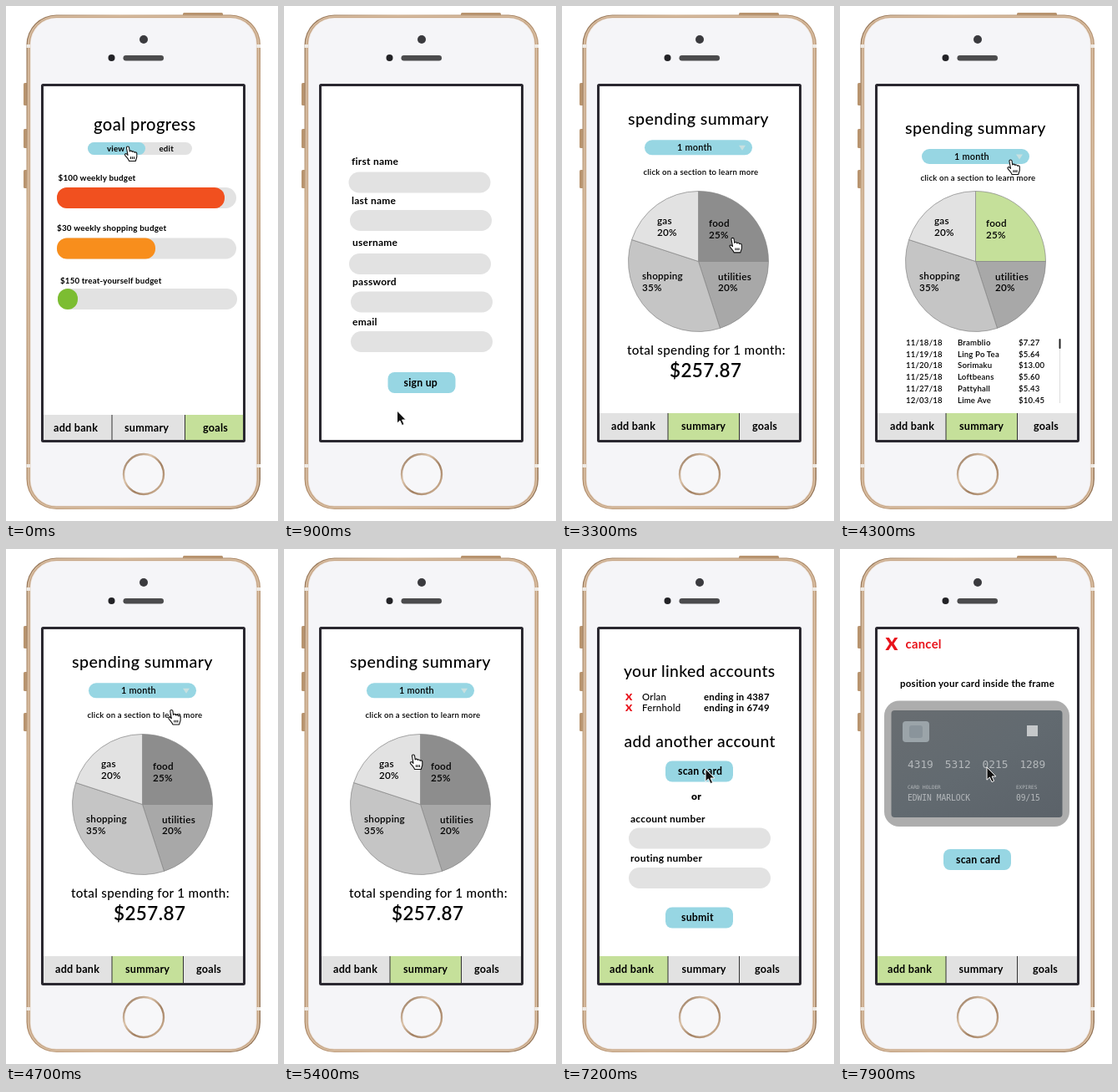
An HTML page for the animation above (8 s loop, 326 by 616 pixels).

```html
<!DOCTYPE html>
<html lang="en">
<head>
<meta charset="utf-8">
<title>Budget app walkthrough</title>
<style>
html, body { margin: 0; width: 100%; height: 100%; overflow: hidden; background: #fff; }
svg { display: block; width: 100vw; height: 100vh; }
text { font-family: Lato, "Open Sans", sans-serif; letter-spacing: .02em; white-space: pre; }
.mono { font-family: "DejaVu Sans Mono", monospace; letter-spacing: 0; }
</style>
</head>
<body>
<svg id="stage" viewBox="0 0 326 616"></svg>
<script>
const BLUE = '#97d6e3', GREEN = '#c5e09a', GREY = '#e2e2e2', RED = '#e8131b';

const rect = (x, y, w, h, r, fill, extra = '') =>
  `<rect x="${x}" y="${y}" width="${w}" height="${h}" rx="${r}" fill="${fill}" ${extra}/>`;
const circle = (x, y, r, fill, extra = '') =>
  `<circle cx="${x}" cy="${y}" r="${r}" fill="${fill}" ${extra}/>`;
const text = (x, y, size, str, weight = 700, fill = '#000', extra = '') =>
  `<text x="${x}" y="${y}" font-size="${size}" font-weight="${weight}" fill="${fill}" ${extra}>${str}</text>`;
const button = (x, y, tx, label) =>
  rect(x, y, 81, 25, 8, BLUE) + text(tx, y + 16.5, 12.3, label);
const field = (x, y) => rect(x, y, 170, 25, 12.5, GREY);

function tabs(active, xs, top = 487, split = 212.5) {
  const edges = [45, 127, split, 284];
  return ['add bank', 'summary', 'goals'].map((label, i) =>
    rect(edges[i], top, edges[i + 1] - edges[i], 519 - top, 0, i === active ? GREEN : GREY) +
    (i ? rect(edges[i] - .5, top, 1, 519 - top, 0, '#333') : '') +
    text(xs[i], top + 20, 12.6, label)).join('');
}

function phone() {
  const shell = (inset, fill) =>
    rect(24.5 + inset, 10.5 + inset * .8, 280.5 - 2 * inset, 591.5 - 1.6 * inset, 36 - inset, fill);
  return `<defs>
    <linearGradient id="gold" x1="0" y1="0" x2="1" y2="1">
      <stop offset="0" stop-color="#8f6f52"/><stop offset=".2" stop-color="#c9a988"/>
      <stop offset=".45" stop-color="#a98564"/><stop offset=".65" stop-color="#cbab8b"/>
      <stop offset="1" stop-color="#8a6a4d"/>
    </linearGradient>
    <linearGradient id="ring" x1="0" y1="0" x2="1" y2="1">
      <stop offset="0" stop-color="#8a6a4f"/><stop offset=".35" stop-color="#dcc4ab"/>
      <stop offset=".6" stop-color="#a17f61"/><stop offset="1" stop-color="#d6bb9f"/>
    </linearGradient>
    <linearGradient id="card" x1="0" y1="0" x2="1" y2="1">
      <stop offset="0" stop-color="#686d71"/><stop offset=".5" stop-color="#626a70"/>
      <stop offset="1" stop-color="#5b6269"/>
    </linearGradient>
    <filter id="soft"><feGaussianBlur stdDeviation=".6"/></filter>
  </defs>` +
    rect(212, 8, 48, 5, 1.5, '#b8946f') +
    [[92, 27], [147, 23], [196, 22]].map(([y, h]) => rect(21, y, 6, h, 1.5, '#b8946f')).join('') +
    shell(0, 'url(#gold)') + shell(1.3, '#d9bfa3') + shell(3, '#c4a282') +
    [46, 548].map(y => rect(24.5, y, 280.5, 4, 0, '#efebe6')).join('') +
    shell(4.3, '#e9ddd2') + shell(5.2, '#f5f5f8') +
    circle(165, 40, 5, '#3a3a3e') + circle(126.5, 62, 4, '#222226') +
    rect(140.5, 59, 48.5, 6.5, 3.2, '#4b4b4d') +
    circle(165, 560, 24, '#f7f7f9', 'stroke="url(#ring)" stroke-width="2.4"') +
    rect(43.5, 94.5, 242, 426, 1, '#fff', 'stroke="#2a2830" stroke-width="3"');
}

function goals() {
  const bar = (x, y, w, fill) => rect(x, y, 215, 25, 12.5, GREY) + rect(x, y, w, 25, 12, fill);
  return text(105, 149, 20.2, 'goal progress', 500) +
    rect(98, 163, 125, 15, 7.5, GREY) + rect(98, 163, 69, 15, 7.5, BLUE) +
    text(121, 173.5, 9.7, 'view') + text(183.5, 173.5, 9.7, 'edit') +
    text(62.5, 208.5, 9.9, '$100 weekly budget') + bar(61, 217, 201, '#f1501f') +
    text(61, 269, 9.9, '$30 weekly shopping budget') + bar(61, 277.5, 118, '#f88e1c') +
    text(65, 331.5, 9.7, '$150 treat-yourself budget') + bar(62, 338, 24, '#7cbd32') +
    tabs(2, [57, 142, 236], 489, 214.5);
}

function signUp() {
  return [['first name', 81, 189.5, 77.5, 198.5], ['last name', 81, 237, 79, 244],
    ['username', 82, 286.5, 78, 296], ['password', 82, 334, 80, 341.5], ['email', 82, 381.5, 80, 389]]
    .map(([label, x, y, fx, fy]) => text(x, y, 12, label) + field(fx, fy)).join('') +
    button(124.5, 438, 143.5, 'sign up');
}

function welcome() {
  const section = (y, title, chip, w, lines, gap) =>
    text(62, y, 12.8, title) +
    text(62, y + gap, 8.8, 'from the') +
    rect(97, y + gap - 10, w, 13, 3.5, BLUE) +
    text(100.5, y + gap, 8.8, chip, 700, '#fff') +
    lines.map((l, i) => text(i ? 62 : 98 + w, y + gap + i * 13.4, 8.8, l)).join('');
  return text(62, 157, 32, 'welcome to') +
    text(63, 184, 36.8, 'mossy coin', 700, GREEN, 'stroke="#7c8f62" stroke-width=".8"') +
    section(215.5, 'view your spending habits', 'summary', 47, ['page, click on different',
      'sections on the pie chart to view detailed', 'information on that spending category.'], 17) +
    section(297, 'add your bank accounts', 'add bank', 47, ['page, add all of your bank',
      'accounts and credit/debit cards to get', 'integrated information across all of your', 'accounts.'], 17) +
    section(388.5, 'set goals for yourself', 'goals', 31, ['page, easily view your',
      'progress on custom-made goals or make new', 'ones.'], 17.8) +
    rect(147, 468.5, 121, 35, 13, BLUE) + text(157.5, 490, 13, 'continue to app');
}

function pie(cx, cy, r, foodFill) {
  const at = p => {
    const a = p * 2 * Math.PI;
    return `${cx + r * Math.sin(a)} ${cy - r * Math.cos(a)}`;
  };
  return [[0, .25, foodFill], [.25, .45, '#a8a8a8'], [.45, .8, '#c5c5c5'], [.8, 1, GREY]]
    .map(([a, b, fill]) => `<path d="M${cx} ${cy}L${at(a)}A${r} ${r} 0 0 1 ${at(b)}Z" fill="${fill}" stroke="#858585" stroke-width=".7"/>`)
    .join('');
}

// The two summary views differ by a small offset in their upper part.
function summary(dx, dy, foodFill) {
  const label = (x, y, name, share) =>
    text(x + dx, y, 11.7, name, 600) + text(x + dx, y + 13.5, 11.7, share, 600);
  return text(78 + dx, 153 - dy, 19.7, 'spending summary', 500) +
    rect(98 + dx, 171 - dy, 129, 18, 9, BLUE) + text(137 + dx, 184 - dy, 10.9, '1 month', 600) +
    `<path d="M${211 + dx} ${177.5 - dy}h8l-4 6z" fill="#c8e0e0"/>` +
    text(96.5 + dx, 209 - dy * .65, 9.6, 'click on a section to learn more', 600) +
    pie(162.5 + dx, 305.5, 84, foodFill) +
    label(113, 261, 'gas', '20%') + label(175, 264, 'food', '25%') +
    label(95, 327, 'shopping', '35%') + label(186, 327.5, 'utilities', '20%');
}

function foodView() {
  const rows = [['11/18/18', 'Bramblio', '$7.27'], ['11/19/18', 'Ling Po Tea', '$5.64'],
    ['11/20/18', 'Sorimaku', '$13.00'], ['11/25/18', 'Loftbeans', '$5.60'],
    ['11/27/18', 'Pattyhall', '$5.43'], ['12/03/18', 'Lime Ave', '$10.45']];
  return summary(0, 0, GREEN) +
    rows.map((row, i) => row.map((s, c) =>
      text([79, 141, 214][c], 406 + i * 13.7, 9.6, s, 600)).join('')).join('') +
    rect(263, 398, 1, 77, 0, '#ddd') + rect(262.5, 398, 2, 12, 1, '#222') +
    tabs(1, [60, 143, 232]);
}

function totalView() {
  return summary(1, 10.7, '#8d8d8d') +
    text(78, 416.5, 15.2, 'total spending for 1 month:', 500) +
    text(129, 444, 22.4, '$257.87', 600) + tabs(1, [59, 143, 228]);
}

function accounts() {
  const row = (y, name, end) => text(76, y, 12, 'X', 900, RED) +
    text(96, y, 11.4, name, 500) + text(170, y, 11.4, 'ending in ' + end);
  return text(74, 153, 19.3, 'your linked accounts', 500) +
    row(180.5, 'Orlan', 4387) + row(194.3, 'Fernhold', 6749) +
    text(74.5, 237, 19.3, 'add another account', 500) +
    button(124, 253.5, 139, 'scan card') + text(155, 300, 12, 'or', 900) +
    text(82, 326.5, 12, 'account number') + field(80, 333.5) +
    text(82, 374, 12, 'routing number') + field(80, 381) +
    button(124, 428.5, 143, 'submit') + tabs(0, [57, 143.5, 231]);
}

function scan() {
  const print = (x, y, size, s) => text(x, y, size, s, 400, '#b4b8bb', 'class="mono"');
  return text(54.5, 121, 21.5, 'X', 900, RED) + text(78.5, 118.5, 14.8, 'cancel', 700, RED) +
    text(72, 164.5, 11.5, 'position your card inside the frame') +
    rect(53, 181.5, 222, 150.5, 18, '#adadad') +
    '<g filter="url(#soft)">' + rect(61.5, 193, 205, 128, 4, 'url(#card)') +
    rect(75, 206, 32, 25, 4, '#9ba4a9') + rect(83, 211, 16, 15, 3, '#8a949b') +
    rect(224, 211, 13, 13, 0, '#c5c8ca') +
    ['4319', '5312', '0215', '1289'].map((s, i) => print(81 + i * 44.8, 261.5, 12.8, s)).join('') +
    print(81, 287, 6, 'CARD HOLDER') + print(211, 287, 6, 'EXPIRES') +
    print(81, 300.5, 9.6, 'EDWIN MARLOCK') + print(211, 300.5, 9.6, '09/15') + '</g>' +
    button(124, 359, 139, 'scan card') + tabs(0, [57, 142.5, 231]);
}

const pages = { goals, signUp, welcome, totalView, foodView, accounts, scan };
const cuts = [[0, 'goals'], [100, 'signUp'], [1500, 'welcome'], [2700, 'totalView'],
  [3600, 'foodView'], [4700, 'totalView'], [5900, 'accounts'], [7400, 'scan']];

// Pointer tip: time, x, y
const path = [[0, 146, 168], [99, 146, 168], [100, 135.5, 484], [900, 135.5, 484],
  [1300, 162, 452], [1600, 162, 452], [2300, 196.5, 488], [2700, 196.5, 488],
  [3400, 205, 265], [3700, 205, 265], [4200, 204.5, 184], [4600, 204.5, 184],
  [5000, 165, 238], [5300, 165, 238], [5400, 155, 246], [5800, 84.5, 499], [6500, 84.5, 499],
  [7200, 172, 263], [7600, 172, 263], [7800, 176, 261], [8000, 176, 261]];

const stage = document.getElementById('stage');
stage.innerHTML = phone() +
  Object.entries(pages).map(([id, draw]) => `<g id="${id}">${draw()}</g>`).join('') +
  `<g id="pointer">
    <path id="arrow" d="M0 0V15.2L3.4 12L6 17.6L8.6 16.4L6.1 11H10.8Z" fill="#111" stroke="#fff" stroke-width="1"/>
    <path id="hand" d="M-1.6 1.5C-1.6-.5 1.4-.5 1.6 1.5L2.2 6C2.6 4.7 5 4.8 5.2 6.5C5.8 5.4 8 5.8 8.1 7.3C9 6.5 10.8 7 10.8 8.6V12.5L9.3 17.5H1.6C.8 15-1.5 13-3.3 10.6C-4.3 9.1-2.6 7.9-1.2 9.2L0 10.3ZM3.5 12.2V15M5.5 12.2V15M7.5 12.2V15"
      fill="#fff" stroke="#111" stroke-width="1.1" stroke-linejoin="round"/>
  </g>`;
const el = id => document.getElementById(id);
const show = (id, on) => el(id).setAttribute('display', on ? 'inline' : 'none');

function draw(now) {
  const t = Math.floor(now % 8000 / 100) * 100;   // ten pictures a second
  const page = cuts.filter(c => c[0] <= t).pop()[1];
  Object.keys(pages).forEach(id => show(id, id === page));

  const i = path.findIndex(p => p[0] > t);
  const [t0, x0, y0] = path[i - 1], [t1, x1, y1] = path[i];
  const u = (t - t0) / (t1 - t0), k = u * u * (3 - 2 * u);
  el('pointer').setAttribute('transform', `translate(${x0 + (x1 - x0) * k} ${y0 + (y1 - y0) * k})`);
  const hand = ['goals', 'foodView', 'totalView'].includes(page);
  show('hand', hand);
  show('arrow', !hand);
}

const start = performance.now();
function tick() {
  draw(performance.now() - start);
  requestAnimationFrame(tick);
}
tick();
</script>
</body>
</html>
```
